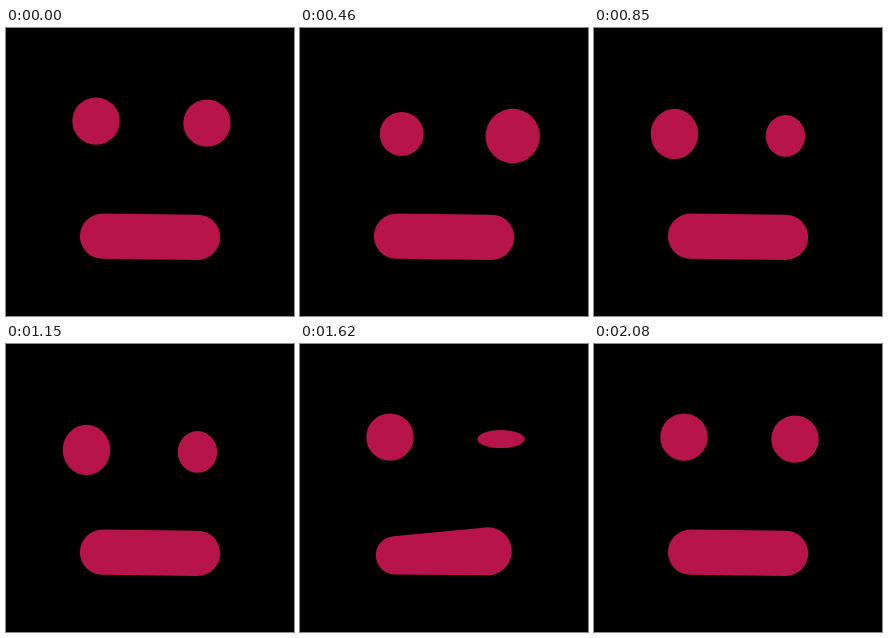
Animation of 288x288 px, one loop 2.16 s. Source, as an HTML page with a canvas:

```html
<!DOCTYPE html>
<html lang="en">
<head>
<meta charset="utf-8">
<title>Face</title>
<style>
  html, body { margin: 0; height: 100%; overflow: hidden; background: #000; }
  canvas { display: block; }
</style>
</head>
<body>
<canvas id="stage" width="288" height="288"></canvas>
<script>
const ctx = document.getElementById('stage').getContext('2d');
const LOOP = 2160;
const RADIUS = 23.7;

const mix = (a, b, k) => a + (b - a) * k;

// Stepped gesture: 0, then `part` on the way in and out, 1 while held.
function gesture(t, start, peak, fall, end, part) {
  if (t < start || t >= end) return 0;
  return t >= peak && t < fall ? 1 : part;
}

// side is -1 for the left eye, 1 for the right one.
function drawEye(side, look, wide, wink) {
  const turn = Math.abs(look);
  const x = 145.5 + 55.5 * side + 26.5 * look;
  const dip = 10.7 * turn / (turn * turn + 0.17);
  const y = 94.1 + side + dip;

  // The eye on the side being looked at comes closer.
  const size = RADIUS * (1 + look * (0.25 * side + 0.085));
  const strain = Math.max(0, 2 * wink - 1);
  let rx = size * (1 + 0.15 * Math.min(0, look));
  let ry = size + 4 * wide;
  if (side > 0) {
    rx += 2.5 * strain;
    ry *= 0.145 ** wink;
  } else {
    ry += 5.5 * strain;
  }

  ctx.beginPath();
  ctx.ellipse(x, y, rx, ry, 0, 0, 2 * Math.PI);
  ctx.fill();
}

// Two circles joined by their outer tangents; a wink skews them.
function drawMouth(wink) {
  const x1 = mix(96.5, 93.5, wink), x2 = mix(191.6, 184, wink);
  const y1 = mix(208.2, 214.4, wink), y2 = mix(209.3, 205.3, wink);
  const r1 = mix(22.6, 15.8, wink), r2 = mix(22.6, 25.4, wink);
  const dx = x2 - x1, dy = y2 - y1;
  const axis = Math.atan2(dy, dx);
  const spread = Math.acos((r1 - r2) / Math.hypot(dx, dy));
  ctx.beginPath();
  ctx.arc(x1, y1, r1, axis + spread, axis - spread + 2 * Math.PI);
  ctx.arc(x2, y2, r2, axis - spread, axis + spread);
  ctx.fill();
}

function draw() {
  const t = performance.now() % LOOP;
  const look = gesture(t, 80, 150, 460, 540, 0.44)
             - gesture(t, 850, 920, 1150, 1230, 0.36);
  const wide = gesture(t, 1310, 1310, 1460, 1460, 0);
  const wink = gesture(t, 1620, 1770, 1920, 2080, 0.5);

  ctx.fillStyle = '#000';
  ctx.fillRect(0, 0, 288, 288);
  ctx.fillStyle = '#b8144c';
  drawEye(-1, look, wide, wink);
  drawEye(1, look, wide, wink);
  drawMouth(wink);
  requestAnimationFrame(draw);
}
draw();
</script>
</body>
</html>
```
